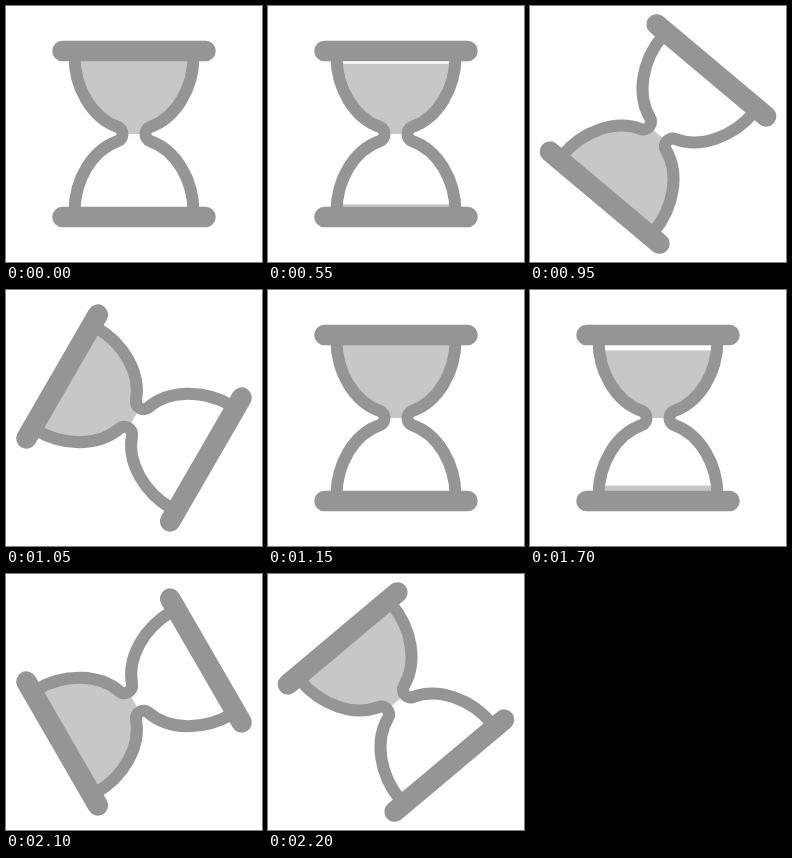
Animation of 256 by 256 pixels, one loop 2250 ms. Source, as an HTML page:

```html
<!DOCTYPE html>
<html lang="en">
<head>
<meta charset="utf-8">
<title>Hourglass</title>
<style>
  html, body { margin: 0; height: 100%; overflow: hidden; background: #fff; }
  svg { display: block; width: 100%; height: 100%; }
</style>
</head>
<body>
<svg viewBox="0 0 256 256">
  <g id="hourglass">
    <g fill="#c7c7c7">
      <rect id="upper" x="70" width="116"/>
      <rect id="lower" x="70" width="116"/>
    </g>
    <g stroke="#959595" stroke-width="12" fill="#fff">
      <!-- The white fill hides the sand outside the curved wall -->
      <path id="wall" d="M68.5 50C68.5 82 86 112 112 121C118 123 118 133 112 135C86 144 68.5 174 68.5 206"/>
      <use href="#wall" transform="matrix(-1 0 0 1 256 0)"/>
      <path d="M56.5 45H199.5M56.5 211H199.5" stroke-width="20.5" stroke-linecap="round"/>
    </g>
  </g>
</svg>
<script>
  const STEP = 50, LOOP = 2250, TURN = LOOP / 2;
  const FLOW_START = 304, FLIP_START = 900;
  const TOP = 45, MIDDLE = 128, BOTTOM = 211;
  const get = id => document.getElementById(id);
  const hourglass = get('hourglass'), upper = get('upper'), lower = get('lower');

  function setSand(rect, y, end) {
    rect.setAttribute('y', y);
    rect.setAttribute('height', end - y);
  }

  function draw(time) {
    const phase = time % TURN;
    const flow = Math.max(0, phase - FLOW_START);
    const level = phase < FLIP_START ? TOP + 0.00021 * flow ** 2 : MIDDLE;
    const angle = 180 * Math.max(0, phase - FLIP_START) / (TURN - FLIP_START);
    setSand(upper, level, MIDDLE);
    setSand(lower, 2 * MIDDLE - level, BOTTOM);
    hourglass.setAttribute('transform', `rotate(${angle} 128 128)`);
  }

  const start = performance.now();
  function tick() {
    // A small lead keeps each step from landing one refresh late
    const elapsed = performance.now() - start + 8;
    draw(Math.floor(elapsed / STEP) * STEP % LOOP);
    requestAnimationFrame(tick);
  }
  tick();
</script>
</body>
</html>
```
